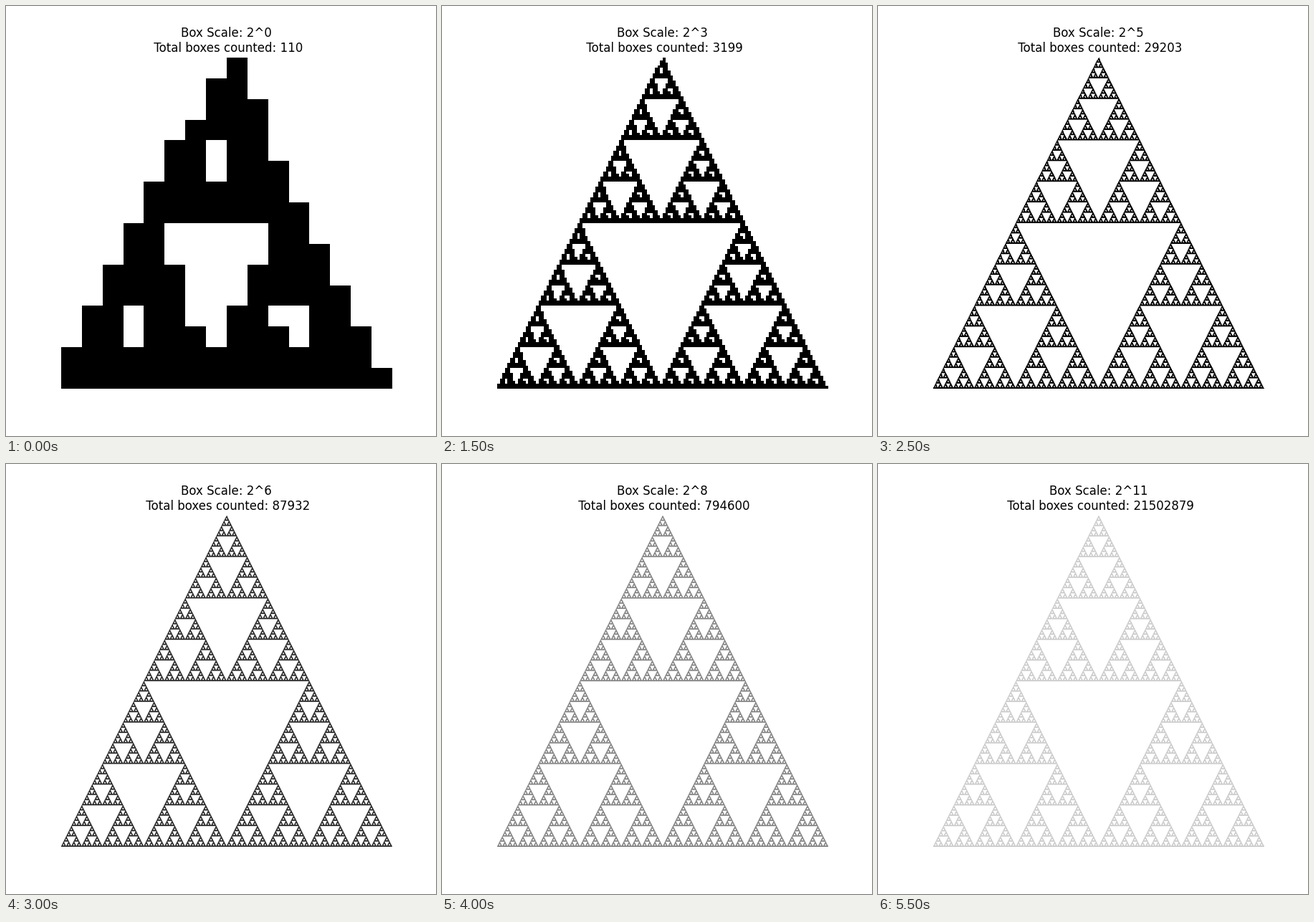
A matplotlib script that plays this animation: 600x600 px, repeating every 6 s.

```python
import numpy as np
import matplotlib.pyplot as plt
from matplotlib.animation import FuncAnimation

LEVELS = 12
FINEST = 9          # deeper levels only thin out below pixel size
MAX_CELLS = 2048
# Cells missing from (width, height) relative to the nominal size.
SHRINK = {"tip": (1, 1), "left": (1, 0), "right": (0, 0)}


def extent(kind, size):
    dw, dh = SHRINK[kind]
    return size - dw, size - dh


def solid(kind, size=4):
    """Smallest filled triangle, its edges rounded to cells."""
    w, h = extent(kind, size)
    apex = size / 2
    grid = np.zeros((h + 1, w + 1), bool)
    for row in range(h + 1):
        t = row / h
        first = int(np.ceil(apex * (1 - t) - 0.5))
        last = int(np.ceil(apex + (w - apex) * t - 0.5))
        grid[row, first:last + 1] = True
    return grid


def join(kind, size, parts):
    """Triangle of twice the size, made of three smaller ones."""
    w, h = extent(kind, size)
    grid = np.zeros((h + 1, w + 1), bool)
    lower_left = "right" if kind == "right" else "left"
    for part, x, y in ((kind, size // 4, 0),
                       (lower_left, 0, h // 2),
                       ("right", w // 2, h // 2)):
        tile = parts[part]
        grid[y:y + tile.shape[0], x:x + tile.shape[1]] |= tile
    return grid


def box_count(level):
    k = level + 4
    return (3 ** (k + 1) - 3) // 2 - 5 * 2 ** (k - 3)


def density(grid):
    n = min(len(grid), MAX_CELLS)
    block = len(grid) // n
    if block == 1:
        return grid.astype(np.float32)
    return grid.reshape(n, block, n, block).mean(axis=(1, 3), dtype=np.float32)


def build_fields():
    parts = {kind: solid(kind) for kind in SHRINK}
    fields = []
    for level in range(FINEST + 1):
        size = 2 ** (level + 3)
        if level == 0:
            parts = {kind: join(kind, size, parts) for kind in SHRINK}
        tip = join("tip", 2 * size, parts)
        fields.append(density(tip))
        if level < FINEST:
            parts = {"tip": tip,
                     "left": join("left", 2 * size, parts),
                     "right": join("right", 2 * size, parts)}
    for level in range(FINEST + 1, LEVELS):
        ratio = box_count(level) / box_count(FINEST) / 4 ** (level - FINEST)
        fields.append(fields[FINEST] * np.float32(ratio))
    return fields


fields = build_fields()
fig, ax = plt.subplots(figsize=(6, 6), dpi=100)
ax.axis("off")
image = ax.imshow(fields[0], cmap="gray_r", vmin=0, vmax=1, extent=(0, 1, 0, 1))
title = ax.set_title("")


def update(level):
    image.set_data(fields[level])
    title.set_text(f"Box Scale: 2^{level}\n Total boxes counted: {box_count(level)}")
    return image, title


anim = FuncAnimation(fig, update, frames=LEVELS, interval=500, repeat=True)
plt.show()
```
